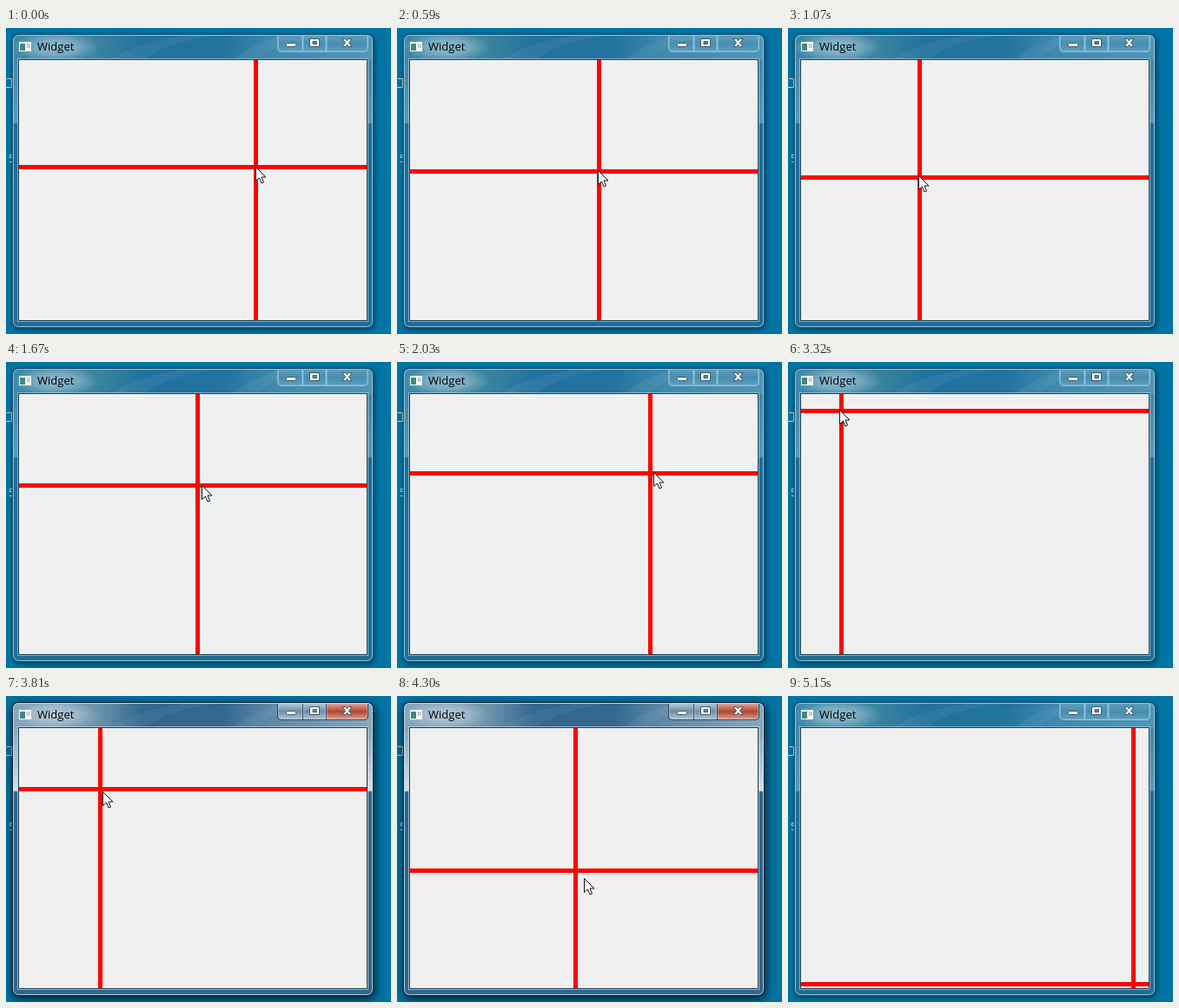
These frames come from a looping animation (443 by 353 pixels, 5.25 s). An HTML page:

```html
<!DOCTYPE html>
<html lang="en">
<head>
<meta charset="utf-8">
<title>Crosshair widget</title>
<style>
html, body { margin: 0; width: 100%; height: 100%; overflow: hidden; background: #0274a4; }
svg {
  display: block;
  --a: #3f88aa; --b: #39839f; --c: #22729e; --d: #3f89ae; --e: #5196b8;
  --side: #559abb; --low: #1d6e9a; --edge: #a5cfdf; --rim: #1b4f69;
  --btn1: #5d9dbc; --btn2: #468eb2; --close1: #5d9dbc; --close2: #468eb2; --line: #9cc8db;
  --shadow: drop-shadow(1px 2px 3px #0007);
}
svg.active {
  --a: #86a6bb; --b: #6b93ad; --c: #336790; --d: #5e89a9; --e: #87a7bd;
  --side: #d3e1eb; --low: #30658d; --edge: #c8dfea; --rim: #12222d;
  --btn1: #b3c6d4; --btn2: #6d8ea8; --close1: #dfa295; --close2: #ae4532; --line: #223d50;
  --shadow: drop-shadow(1px 3px 6px #000c);
}
#frame { filter: var(--shadow); }
text { font-family: "Open Sans", "Noto Sans", sans-serif; }
</style>
</head>
<body>
<svg id="stage" width="443" height="353" viewBox="0 0 443 353">
  <defs>
    <linearGradient id="title" gradientUnits="userSpaceOnUse" x1="9" y1="0" x2="421" y2="40">
      <stop offset="0" stop-color="var(--a)"/>
      <stop offset=".24" stop-color="var(--b)"/>
      <stop offset=".36" stop-color="var(--c)"/>
      <stop offset=".58" stop-color="var(--c)"/>
      <stop offset=".72" stop-color="var(--d)"/>
      <stop offset="1" stop-color="var(--e)"/>
    </linearGradient>
    <linearGradient id="sides" gradientUnits="userSpaceOnUse" x1="0" y1="37" x2="0" y2="344">
      <stop offset="0" stop-color="var(--a)"/>
      <stop offset=".235" stop-color="var(--side)"/>
      <stop offset=".24" stop-color="var(--low)"/>
      <stop offset="1" stop-color="var(--low)"/>
    </linearGradient>
    <linearGradient id="btn" x2="0" y2="1">
      <stop stop-color="var(--btn1)"/>
      <stop offset=".48" stop-color="var(--btn2)"/>
      <stop offset="1" stop-color="var(--btn1)"/>
    </linearGradient>
    <linearGradient id="red" x2="0" y2="1">
      <stop stop-color="var(--close1)"/>
      <stop offset=".5" stop-color="var(--close2)"/>
      <stop offset="1" stop-color="var(--close1)"/>
    </linearGradient>
    <radialGradient id="glow">
      <stop stop-color="#fff" stop-opacity=".45"/>
      <stop offset=".5" stop-color="#fff" stop-opacity=".3"/>
      <stop offset="1" stop-color="#fff" stop-opacity="0"/>
    </radialGradient>
    <clipPath id="bar"><path d="M9 37V14q0-5 5-5H416q5 0 5 5V37Z"/></clipPath>
  </defs>

  <rect width="443" height="353" fill="#0274a4"/>
  <path d="M1 58.5H6.5V68.500H0" fill="none" stroke="#c9d2ca"/>
  <text x="3" y="155" font-size="12" fill="#c9d8dc">5</text>

  <rect id="frame" x="7" y="7" width="416" height="339" rx="7" fill="var(--rim)"/>
  <rect x="8" y="8" width="414" height="337" rx="6" fill="url(#sides)"/>
  <g clip-path="url(#bar)">
    <rect x="9" y="9" width="412" height="28" fill="url(#title)"/>
    <path d="M120 37Q150 16 205 9H238Q180 18 160 37ZM262 37Q276 20 320 9H345Q300 22 290 37Z" fill="#fff" opacity=".05"/>
    <ellipse cx="58" cy="22" rx="50" ry="18" fill="url(#glow)"/>
  </g>
  <rect x="8.5" y="8.5" width="413" height="336" rx="6" fill="none" stroke="var(--edge)" opacity=".85"/>

  <rect x="13.5" y="35.5" width="403" height="303" fill="none" stroke="var(--edge)" opacity=".7"/>
  <rect x="14" y="36" width="402" height="302" fill="#173d50"/>
  <rect x="15" y="37" width="400" height="300" fill="#f0f0f0"/>

  <rect x="15" y="16" width="14" height="11" fill="#f7faf9"/>
  <rect x="16" y="18" width="6" height="8" fill="#43877f"/>
  <path d="M24 18h1v5h-1zM26 18h1v5h-1z" fill="#9aa9b0"/>
  <text x="36" y="26" font-size="13" fill="#000">Widget</text>

  <path d="M313 9H341V27H317q-4 0-4-4ZM341 9H368V27H341Z" fill="url(#btn)"/>
  <path d="M368 9H416V23q0 4-4 4H368Z" fill="url(#red)"/>
  <path d="M313.500 9V22.500q0 4 4 4H340.500V9M342.500 9V26.500H367.500V9M369.500 9V26.500H411.500q4 0 4-4V9" fill="none" stroke="var(--edge)" opacity=".4"/>
  <path d="M312.500 9V23q0 4.500 4.500 4.500H412q4.500 0 4.500-4.500V9M341.500 9V27M368.500 9V27" fill="none" stroke="var(--line)" opacity=".85"/>
  <g fill="#fff" stroke="#3f5867">
    <rect x="322.500" y="17.500" width="11" height="4" rx="1"/>
    <path fill-rule="evenodd" d="M349.500 12.500H360.500V21.500H349.500ZM353 15.500V18.500H357.500V15.500Z"/>
    <path d="M387 12.500H390.500L392.500 14.800 394.500 12.500H398L394.500 17 398 21.500H394.500L392.500 19.200 390.500 21.500H387L390.500 17Z"/>
  </g>

  <g fill="#f00">
    <rect id="vert" y="37" width="5" height="300"/>
    <rect id="horiz" x="15" width="400" height="5"/>
  </g>
  <path id="cursor" d="M0 0V16L4 12.500 6.500 18.500 9 17.500 6.500 11.500H11.500Z" fill="#fff" stroke="#111"/>
</svg>
<script>
const $ = id => document.getElementById(id);
const LOOP = 5250, GONE = 39, FOCUS = 28;

// Step lengths in ms; every other step lasts 120.
const odd = {0: 470, 17: 100, 24: 110, 29: 130, 32: 130, 37: 130, 38: 240, 39: 100};

// step, crosshair left and top, cursor tip x and y
const keys = [
  [0, 285, 158, 287, 160],
  [6, 149, 170, 150, 170],
  [11, 218, 140, 225, 142],
  [18, 358, 106, 361, 106],
  [25, 59, 54, 59, 55],
  [33, 203, 199, 215, 210],
  [38, 395, 330, 404, 338]
];

function stepAt(t) {
  let step = 0;
  while (step < GONE && t >= (odd[step] || 120)) t -= odd[step++] || 120;
  return step;
}

const slope = (i, c) => (keys[i + 1][c] - keys[i][c]) / (keys[i + 1][0] - keys[i][0]);

// Tangents vanish where the direction turns, so the path never overshoots.
function tangent(i, c) {
  if (i === 0) return slope(0, c);
  if (i === keys.length - 1) return slope(i - 1, c);
  const a = slope(i - 1, c), b = slope(i, c);
  return a * b > 0 ? 2 * a * b / (a + b) : 0;
}

function place(step, c) {
  const s = Math.min(step, 38);
  let i = 0;
  while (i < keys.length - 2 && s >= keys[i + 1][0]) i++;
  const p = keys[i], q = keys[i + 1], h = q[0] - p[0], u = (s - p[0]) / h;
  const ease = u * u * (3 - 2 * u);
  return Math.round(p[c] + (q[c] - p[c]) * ease
    + h * u * (1 - u) * ((1 - u) * tangent(i, c) - u * tangent(i + 1, c)));
}

function draw(now) {
  const step = stepAt(now % LOOP);
  $("stage").classList.toggle("active", step >= FOCUS && step < GONE);
  $("vert").setAttribute("x", place(step, 1));
  $("horiz").setAttribute("y", place(step, 2));
  $("cursor").setAttribute("transform", `translate(${place(step, 3) + .5} ${place(step, 4) + .5})`);
  $("cursor").style.display = step < GONE ? "" : "none";
}

const start = performance.now();
function tick() {
  draw(performance.now() - start);
  requestAnimationFrame(tick);
}
tick();
</script>
</body>
</html>
```
